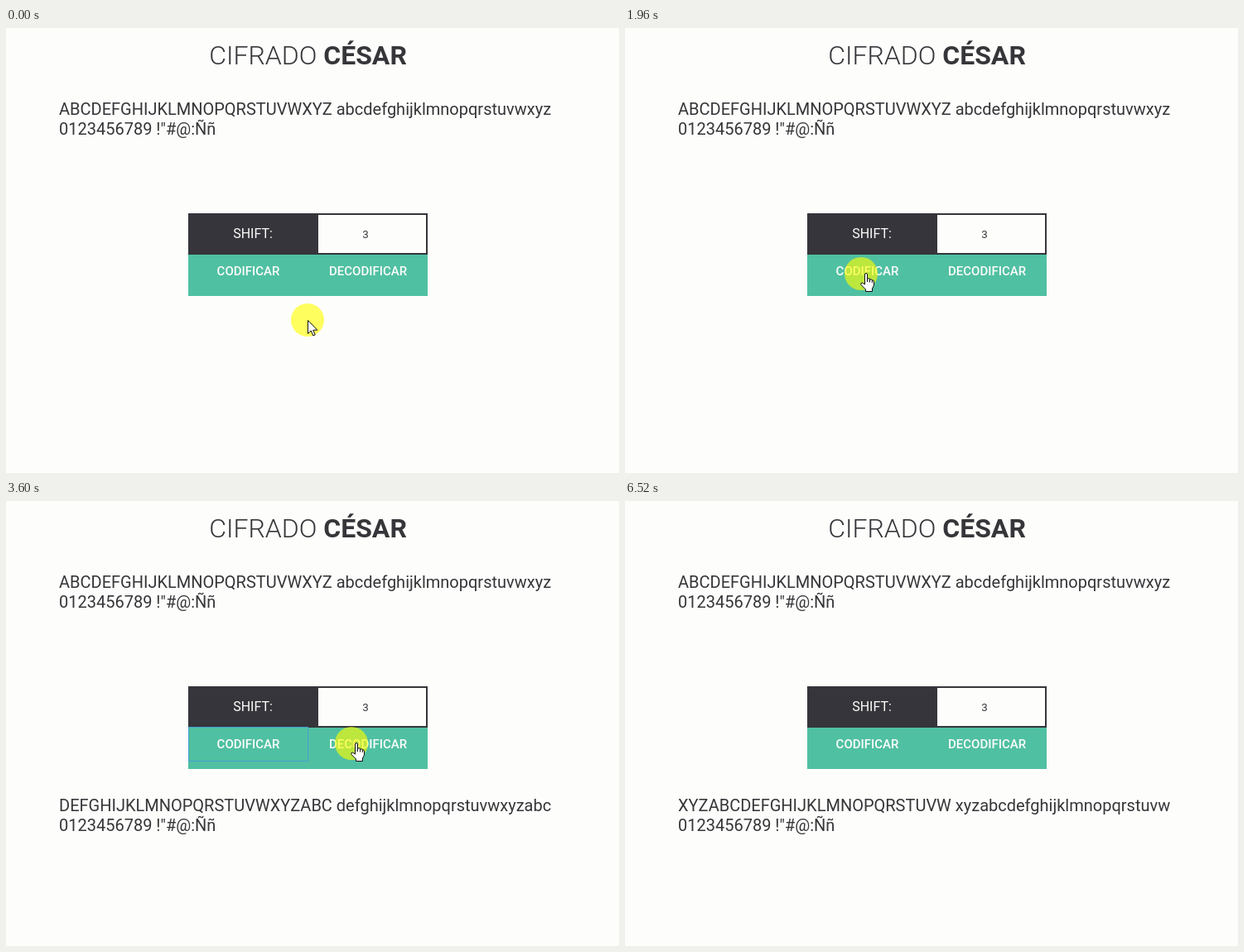
Animation of 740 by 538 pixels, one loop 6.56 s. Source, as an HTML page:

```html
<!DOCTYPE html>
<html lang="es">
<head>
<meta charset="utf-8">
<title>Cifrado César</title>
<style>
html, body { margin: 0; width: 740px; height: 538px; overflow: hidden; background: #fdfdfb; }
svg { display: block; font-family: Roboto, sans-serif; fill: #36363a; }
text { white-space: pre; }
.mid { text-anchor: middle; }
.title { font-size: 32px; font-weight: 300; }
.title tspan { font-weight: 700; }
.body { font-size: 20px; }
.light { fill: #fcfcfa; }
.button { font-size: 15px; font-weight: 500; }
.pointer path { fill: #fff; stroke: #111; stroke-linejoin: round; }
</style>
</head>
<body>
<svg width="740" height="538" viewBox="0 0 740 538">
  <text class="mid title" x="364.5" y="44">CIFRADO <tspan>CÉSAR</tspan></text>
  <g class="body">
    <text id="plain" x="64" y="105"></text>
    <text x="64" y="129">0123456789 !"#@:Ññ</text>
    <g id="result">
      <text id="coded" x="64" y="375"></text>
      <text x="64" y="399">0123456789 !"#@:Ññ</text>
    </g>
  </g>
  <rect x="220" y="224" width="289" height="50" fill="#35353b"/>
  <rect x="377" y="226" width="130" height="46" fill="#fdfdfb"/>
  <text class="mid light" x="298" y="254" font-size="16">SHIFT:</text>
  <text class="mid" x="434" y="254" font-size="13.333">3</text>
  <rect x="220" y="274" width="289" height="50" fill="#50c0a2"/>
  <g class="mid light button">
    <text x="292.5" y="299">CODIFICAR</text>
    <text x="437" y="299">DECODIFICAR</text>
  </g>
  <rect id="focus" y="273.5" width="144" height="41" fill="none" stroke="#4a9fce"/>
  <g id="cursor" class="pointer">
    <circle r="20" fill="#ff0" fill-opacity=".62"/>
    <path id="arrow" d="M.5 .5V16.5L4.2 13L6.8 19L9.2 18L6.7 12.2H11.8Z"/>
    <g id="hand" transform="translate(-1 -1)">
      <path d="M5.5 14V2Q5.5 .5 7 .5T8.5 2V7Q11.5 6 11.5 8Q14 7 14.3 9Q16.5 8.3 16.5 11V15L14.5 19V22.5H6.5V20L1 14.5Q.2 12 2.5 12Z"/>
      <path d="M8.5 7V11M11.5 8V11.5M14.3 9V12"/>
    </g>
  </g>
</svg>
<script>
const LOOP = 6560, ENCODE = 2360, DECODE = 5000, BLUR = 6120;
const $ = id => document.getElementById(id);
const show = (id, on) => $(id).setAttribute('visibility', on ? 'visible' : 'hidden');

const upper = 'ABCDEFGHIJKLMNOPQRSTUVWXYZ';
const rotate = n => upper.slice(n) + upper.slice(0, n);
const line = n => rotate(n) + ' ' + rotate(n).toLowerCase();
$('plain').textContent = line(0);

// Cursor stops: time, x, y
const stops = [
  [0, 364, 353], [340, 364, 353], [1100, 285, 297], [2780, 285, 297],
  [3400, 417, 293], [5560, 417, 293], [6080, 425, 562], [LOOP, 425, 562]
];

function cursorAt(t) {
  const i = stops.findIndex(s => s[0] > t);
  const [t0, x0, y0] = stops[i - 1], [t1, x1, y1] = stops[i];
  const p = (t - t0) / (t1 - t0), e = p * p * (3 - 2 * p);
  return [x0 + (x1 - x0) * e, y0 + (y1 - y0) * e];
}

function draw(now) {
  const t = now % LOOP, decoded = t >= DECODE;
  const [x, y] = cursorAt(t).map(Math.round);
  const overButton = x >= 220 && x < 509 && y >= 274 && y < 315;
  $('cursor').setAttribute('transform', `translate(${x} ${y})`);
  show('arrow', !overButton);
  show('hand', overButton);
  show('result', t >= ENCODE);
  $('coded').textContent = line(decoded ? 23 : 3);
  show('focus', t >= ENCODE && t < BLUR);
  $('focus').setAttribute('x', decoded ? 365.5 : 220.5);
  requestAnimationFrame(draw);
}
draw(0);
</script>
</body>
</html>
```
